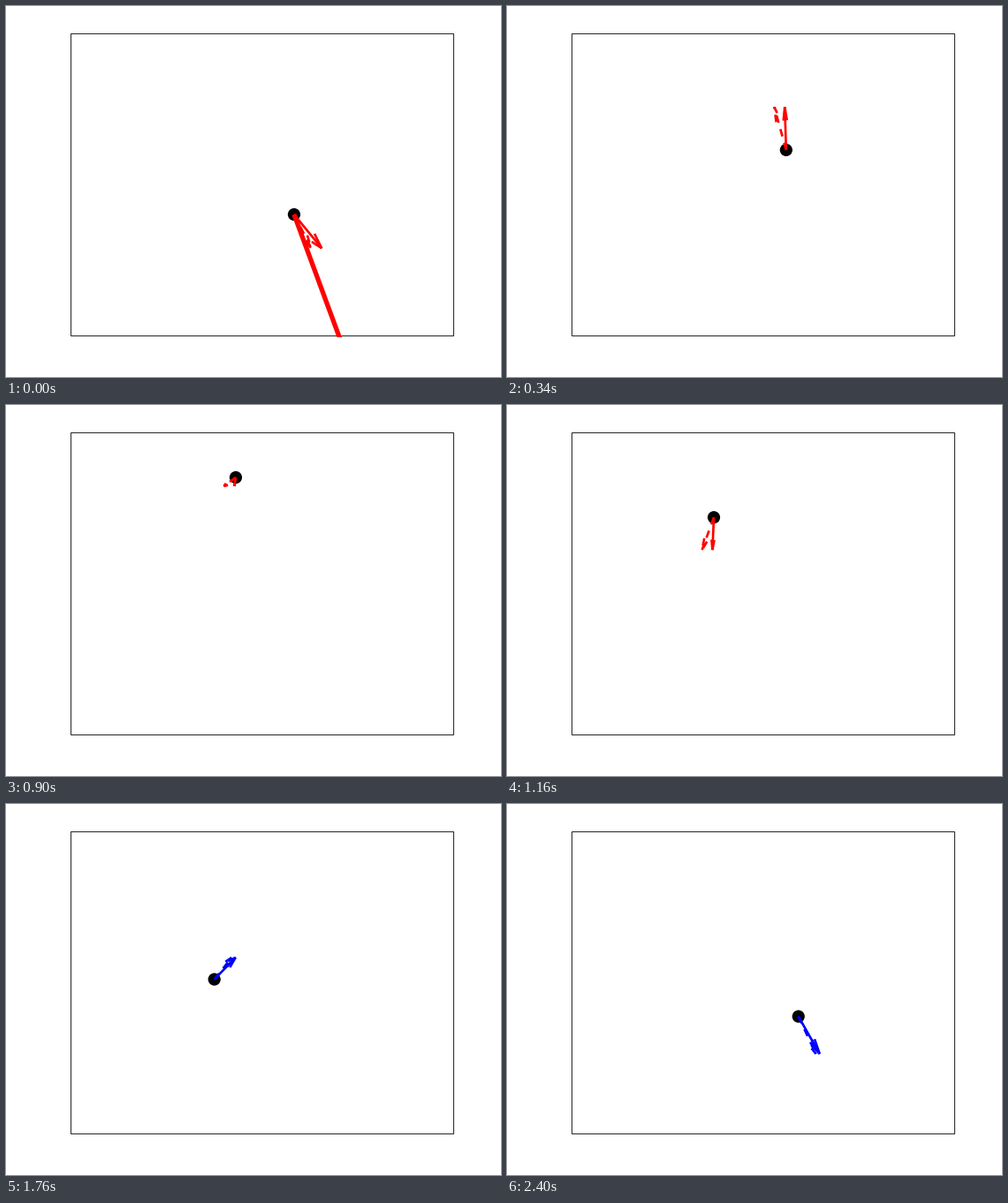
Recreate the animation shown at these times as a matplotlib script. Size 560x420 px, loop 2420 ms.

```python
import numpy as np
import matplotlib.pyplot as plt
from matplotlib.animation import FuncAnimation
from matplotlib.patches import Circle, Rectangle

W, H, DPI = 560, 420, 100
FRAMES, INTERVAL = 121, 20
PT = 72 / DPI                      # points per pixel
GROUND = 374
ARROW_SCALE = 6.7                  # arrow length per pixel/frame
HEAD = 0.31                        # arrow head length ratio
ARROW_W, LEG_W = 2.67, 5.3


def ballistic(n, n0, pos, vel, g):
    """Position and velocity of free flight, known at step n0."""
    d = n - n0
    p = np.array([pos[0] + vel[0] * d, pos[1] + vel[1] * d + g * d * d / 2])
    return p, np.array([vel[0], vel[1] + g * d])


def rise(n):
    return ballistic(n, 17, (315.8, 162.5), (-1.995, -7.244), 0.3108)


def hop(n):
    return ballistic(n, 88, (235.7, 198.0), (2.9375, -3.6875), 0.3125)


def bounce(n, n0, n1, start, end):
    """Spring contact: quintic blend with no acceleration at both ends."""
    (p0, v0), (p1, v1) = start, end
    span = n1 - n0
    u = (n - n0) / span
    d = p1 - p0 - v0 * span
    e = (v1 - v0) * span
    a, b, c = 10 * d - 4 * e, -15 * d + 7 * e, 6 * d - 3 * e
    p = p0 + v0 * span * u + a * u**3 + b * u**4 + c * u**5
    v = v0 + (3 * a * u**2 + 4 * b * u**3 + 5 * c * u**4) / span
    return p, v


START = (np.array([325.9, 235.5]), np.array([2.9, 5.7]))


def state(n):
    """Position, velocity and foot x (None in the air)."""
    if n <= 9:
        return *bounce(n, 0, 9, START, rise(9)), 377
    if n < 71:
        return *rise(n), None
    if n <= 81:
        return *bounce(n, 71, 81, rise(71), hop(81)), 168
    return *hop(n), None


fig = plt.figure(figsize=(W / DPI, H / DPI), dpi=DPI, facecolor="white")
ax = fig.add_axes([0, 0, 1, 1])
ax.set_xlim(0, W)
ax.set_ylim(H - 0.5, -0.5)
ax.axis("off")

ax.add_patch(Rectangle((73.2, 31), 433, 342, fill=False, ec="#262626",
                       lw=PT, zorder=1))
ball = ax.add_patch(Circle((0, 0), 7.1, fc="black", ec="none", zorder=2))


def add_line(width, dashed=False):
    line, = ax.plot([], [], lw=width * PT, zorder=3)
    line.set_solid_capstyle("butt")
    line.set_dash_capstyle("butt")
    line.set_solid_joinstyle("miter")
    line.set_dash_joinstyle("miter")
    if dashed:
        line.set_linestyle((0, (8.5 / width, 7.5 / width)))
    return line


leg = add_line(LEG_W)
leg.set_clip_path(Rectangle((0, 0), W, GROUND + 0.5, transform=ax.transData))
solid = [add_line(ARROW_W) for _ in range(2)]
dashed = [add_line(ARROW_W, True) for _ in range(2)]


def set_arrow(lines, p, d):
    tip = p + d
    back = tip - HEAD * d
    side = np.array([0.041 * d[1], -0.145 * d[0]])
    lines[0].set_data(*np.array([p, tip]).T)
    lines[1].set_data(*np.array([back + side, tip, back - side]).T)


def update(n):
    p, v, foot = state(n)
    first = n < 71
    ball.center = p
    if foot is None:
        leg.set_data([], [])
    else:
        # run past the ground; the clip trims it flat
        end = p + 1.04 * (np.array([foot, GROUND]) - p)
        leg.set_data(*np.array([p, end]).T)
    d = ARROW_SCALE * v
    set_arrow(dashed, p, d)
    set_arrow(solid, p, d + [11.8 if first else 4.3, 0])
    for line in [leg, *solid, *dashed]:
        line.set_color("red" if first else "blue")
    return [ball, leg, *solid, *dashed]


anim = FuncAnimation(fig, update, frames=FRAMES, interval=INTERVAL,
                     init_func=lambda: update(0), repeat=True,
                     repeat_delay=0, blit=False)
plt.show()
```
